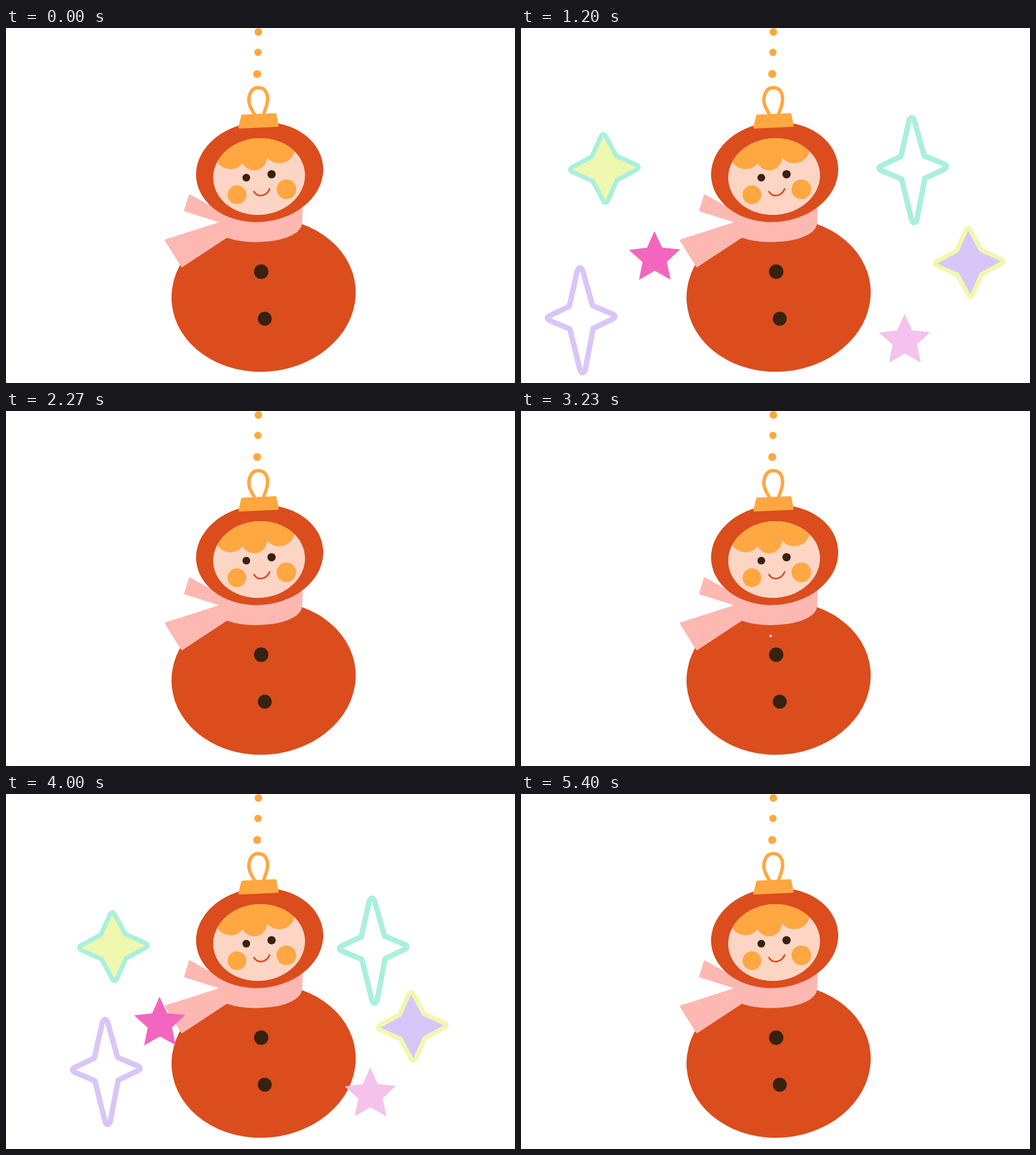
Recreate the animation shown at these times as an HTML page. Size 897x625 px, loop 6310 ms.

```html
<!DOCTYPE html>
<html lang="en">
<head>
<meta charset="utf-8">
<title>Bauble with stars</title>
<style>
  html, body { margin: 0; width: 100%; height: 100%; overflow: hidden; background: #fff; }
  svg { display: block; width: 100%; height: 100%; }
</style>
</head>
<body>
<svg viewBox="0 0 897 625">
  <defs>
    <clipPath id="face"><ellipse cx="446" cy="261.5" rx="81" ry="67.5" transform="rotate(-5 446 261.5)"/></clipPath>
  </defs>

  <g fill="#db4d1d">
    <ellipse cx="454" cy="470" rx="162.5" ry="135" transform="rotate(-5 454 470)"/>
    <path fill="#fdb8b2" stroke="#fdb8b2" stroke-width="4" stroke-linejoin="round"
      d="M324 295L316 321L373 339Q379 342 373 345L282 374L310 419L389 367C430 381 498 376 516 353Q520 348 520 340L521 319L500 300H450L358 314Z"/>
    <ellipse cx="447" cy="253.5" rx="112.3" ry="88" transform="rotate(-6 447 253.5)"/>
  </g>

  <g clip-path="url(#face)">
    <path fill="#fcd5c5" d="M355 185H535V340H355Z"/>
    <path fill="#ffa740" d="M355 225L372 235A27 27 0 0 0 417 238A22.7 22.7 0 0 0 460 228A28 28 0 0 0 508 219V180H355Z"/>
  </g>
  <g fill="#38210f">
    <circle cx="423.5" cy="263.5" r="6.8"/>
    <circle cx="468" cy="257.5" r="7.3"/>
    <circle cx="449.7" cy="429" r="12.7"/>
    <circle cx="456" cy="511.7" r="12.3"/>
  </g>
  <g fill="#ffa740">
    <circle cx="407" cy="293.5" r="16.5"/>
    <circle cx="494" cy="284" r="17.3"/>
    <circle cx="444.7" cy="7" r="6.7"/>
    <circle cx="444" cy="43" r="6.4"/>
    <circle cx="442.7" cy="81" r="7.1"/>
    <path stroke="#ffa740" stroke-width="4" stroke-linejoin="round" d="M411.500 175L416.500 154.500L474.500 152L478.500 172Z"/>
  </g>
  <g fill="none" stroke-linecap="round">
    <path stroke="#ffa740" stroke-width="6" d="M438 152C430 139 427.500 133 428 124C430 110 437 105 445 105C455 105 461 113 461 125C461 136 456 144 454 152"/>
    <path stroke="#db4d1d" stroke-width="3" d="M437 288Q442 296 450 295Q460 294 464.500 283.500"/>
  </g>

  <g id="stars"></g>
</svg>

<script>
const LOOP = 6310;
const ORIGIN = { x: 440, y: 396 };
const BURST_FRAMES = 31;
const MINT = '#aaf0dc', LEMON = '#f0f8b0', LILAC = '#d8c6f8';

const tallSparkle = 'M-4.500-88Q0-97 4.500-88L20.500-25L56-9Q63-5 56-1L20.500 15L4.500 88Q0 97-4.500 88L-20.500 15L-56-1Q-63-5-56-9L-20.500-25Z';
const sparkle = 'M0-56L18.500-18.500L56 0L18.500 18.500L0 56L-18.500 18.500L-56 0L-18.500-18.500Z';
const fiveStar = 'M' + Array.from({ length: 10 }, (_, i) => {
  const r = i % 2 ? 22.5 : 47.5, a = i * Math.PI / 5;
  return `${(r * Math.sin(a)).toFixed(2)} ${(4.5 - r * Math.cos(a)).toFixed(2)}`;
}).join('L') + 'Z';

const outline = color => ({ d: tallSparkle, fill: 'none', stroke: color, 'stroke-width': 9.5, tilt: -1.5 });
const filled = (fill, stroke) => ({ d: sparkle, fill, stroke, 'stroke-width': 16, 'paint-order': 'stroke', tilt: -2 });
const solid = fill => ({ d: fiveStar, fill, tilt: -0.5 });

// dx, dy: full travel from the origin; wave: order of release
const stars = [
  { look: outline(MINT), dx: 284, dy: -165, wave: 1 },
  { look: outline(LILAC), dx: -389, dy: 138, wave: 2 },
  { look: filled(LEMON, MINT), dx: -324, dy: -164.5, wave: 0 },
  { look: filled(LILAC, LEMON), dx: 407.8, dy: 19.5, wave: 2 },
  { look: solid('#f266c0'), dx: -231.7, dy: 5, wave: 1 },
  { look: solid('#f4c2ec'), dx: 261.2, dy: 166, wave: 0 },
];

const layer = document.getElementById('stars');
for (const star of stars) {
  star.node = document.createElementNS('http://www.w3.org/2000/svg', 'path');
  star.node.setAttribute('stroke-linejoin', 'round');
  const { tilt, ...attrs } = star.look;
  for (const name in attrs) star.node.setAttribute(name, attrs[name]);
  layer.append(star.node);
}

const clamp = v => Math.max(0, Math.min(1, v));

// cubic-bezier(.25, 0, 0, 1)
function travel(x) {
  let lo = 0, hi = 1;
  for (let i = 0; i < 24; i++) {
    const s = (lo + hi) / 2;
    if (0.75 * s * (1 - s) ** 2 + s ** 3 < x) lo = s; else hi = s;
  }
  return lo * lo * (3 - 2 * lo);
}

// Step within a burst: the first runs in uneven blocks of ten, the second evenly
function burstFrame(t) {
  if (t >= 100 && t < 2270) {
    const x = t - 100;
    return 10 * Math.floor(x / 700) + Math.min(9, Math.floor((x % 700 + 5) * 3 / 200));
  }
  if (t >= 3230 && t < 5400) return Math.floor((t - 3230) / 70);
  return BURST_FRAMES;
}

function draw(t) {
  const frame = burstFrame(t);
  for (const { node, look, dx, dy, wave } of stars) {
    const age = frame + 0.15 - 1.1 * wave;
    const visible = age > 0 && frame < BURST_FRAMES;
    const grow = 1 - (1 - clamp(age / 9.5)) ** 3;
    const shrink = 1 - clamp((age - 18.2) / 11.6) ** 3;
    const scale = visible ? grow * shrink : 0;
    node.style.display = scale > 0 ? '' : 'none';
    if (!scale) continue;
    const p = travel(clamp(age / 29.3));
    node.setAttribute('transform',
      `translate(${ORIGIN.x + dx * p} ${ORIGIN.y + dy * p}) rotate(${look.tilt}) scale(${scale})`);
  }
}

const start = performance.now();
function tick(now) {
  draw(Math.max(0, now - start) % LOOP);
  requestAnimationFrame(tick);
}
draw(0);
requestAnimationFrame(tick);
</script>
</body>
</html>
```
